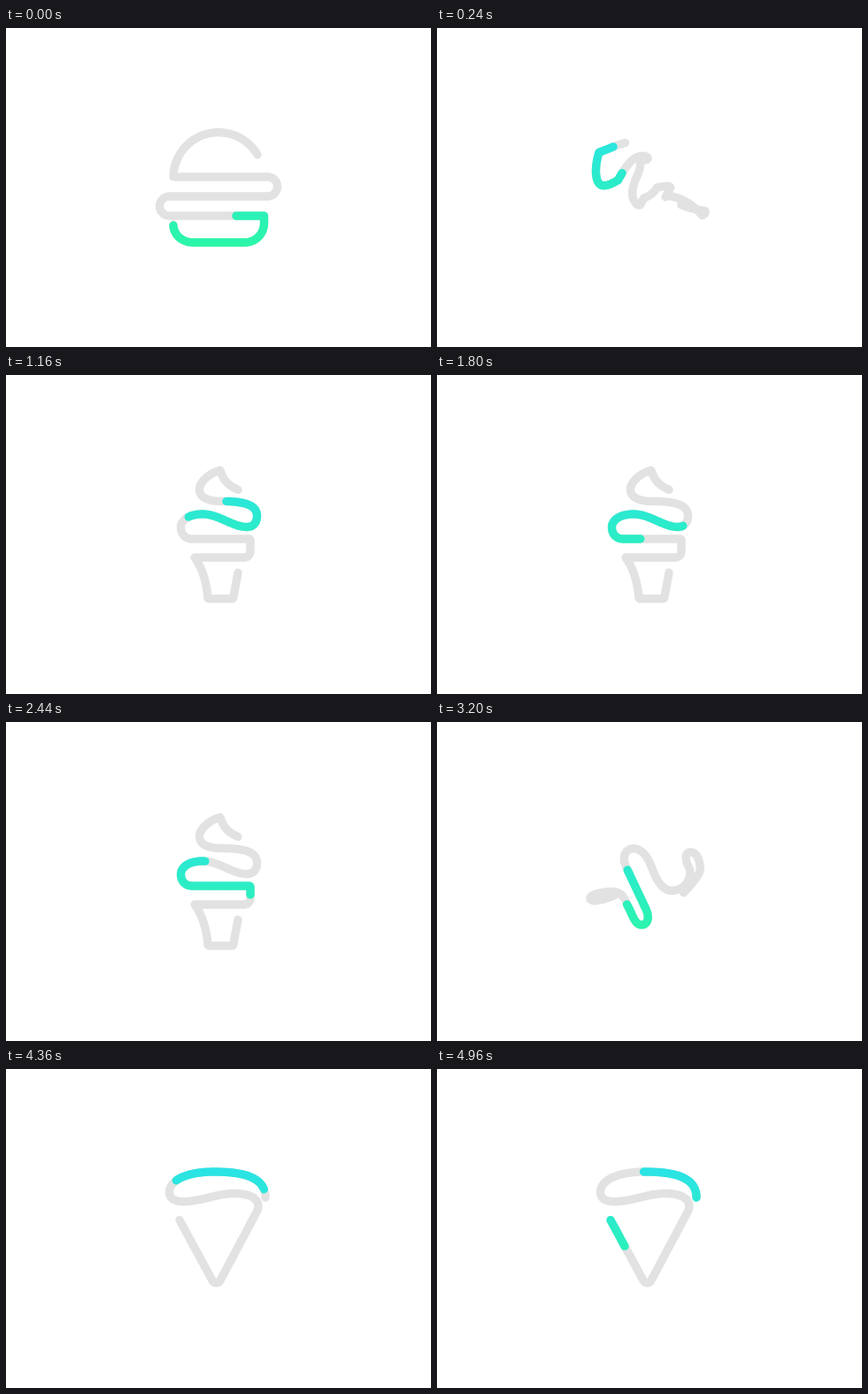
Animation of 480 by 360 pixels, one loop 5 s. Source, as an HTML page:

```html
<!DOCTYPE html>
<html lang="en">
<head>
<meta charset="utf-8">
<title>Food line loader</title>
<style>
  html, body { margin: 0; width: 100%; height: 100%; overflow: hidden; background: #fff; }
  svg { display: block; width: 100vw; height: 100vh; }
  path { fill: none; stroke-width: 9.4; stroke-linecap: round; stroke-linejoin: round; }
  #track { stroke: #e2e2e2; }
  #dash { stroke: url(#tint); stroke-dasharray: 250 750; }
</style>
</head>
<body>
<svg viewBox="0 0 480 360">
  <defs>
    <linearGradient id="tint" gradientUnits="userSpaceOnUse" x1="0" y1="112" x2="0" y2="245">
      <stop offset="0" stop-color="#2be3e6"/>
      <stop offset="1" stop-color="#2bf6a8"/>
    </linearGradient>
  </defs>
  <path id="track"/>
  <path id="dash" pathLength="1000"/>
</svg>
<script>
const LOOP = 5000, LAP = 6000, SECOND_TURN = 3000, MORPH = 400;
const CX = 240, CY = 180, SAMPLES = 300;

// Evenly spaced points along a path, relative to the stage centre.
function sample(d) {
  const path = document.createElementNS('http://www.w3.org/2000/svg', 'path');
  path.setAttribute('d', d);
  const len = path.getTotalLength();
  return Array.from({ length: SAMPLES + 1 }, (_, i) => {
    const p = path.getPointAtLength(len * i / SAMPLES);
    return [p.x - CX, p.y - CY];
  });
}

const burger = sample(
  'M189 222 A22 20 0 0 0 211 242 H270 A21.5 22 0 0 0 291.5 220 V212 H184.5 ' +
  'A11 11 0 0 1 184.5 190 H295.5 A11 11 0 0 0 295.5 168 H189 A51 51 0 0 1 284 143');
const cone = sample(
  'M262 129.5 C250 124 245 118 242 107.5 C229 111 218.5 121 218.5 129 ' +
  'C218.5 138 227 142 242 142.5 C262 142.5 283.5 144 283.5 159 ' +
  'C283.5 167 279 171.5 272 171.5 C256 171.5 240 157 222 157 ' +
  'C206 157 197.5 164 197.5 172 C197.5 180 203 185 210 185 H276 V198 ' +
  'Q276 206 268 206 H213 C222 218 227 236 228 252.5 H256.5 L262 223');
const pizza = sample(
  'M196 170.5 L233.5 239.5 Q237.5 243.5 241.5 239.5 L283.5 160.5 ' +
  'C288 151 282 140.5 258 140.5 C238 140.5 222 149 202 149.5 ' +
  'C192 150 184.5 147 184.5 139 C184.5 125 205 116 235 116 C268 116 293 122 293 145');
const squiggle = sample(
  'M279 192 C290 180 299 170 297 162 C296 152 292 146 286 146 ' +
  'C280 146 279 154 284 163 C289 172 282 192 262 190 ' +
  'C248 186 244 165 238 155 C233 146 226 143 222 143 ' +
  'C214 143 209 150 212 160 L214 165 L236 210 C242 222 238 229 232 229 ' +
  'C224 229 222 218 215 206 C212 196 206 192 198 192 ' +
  'C188 192 173 196 173 200 C174 206 190 202 206 194');

const halfTurn = pts => pts.map(([x, y]) => [-x, -y]);
const quarterBack = pts => pts.map(([x, y]) => [y, -x]);
const mix = (a, b, k) => a.map(([x, y], i) => [x + (b[i][0] - x) * k, y + (b[i][1] - y) * k]);

// Each turn morphs through its stops while rotating by 180 degrees.
const turns = [
  [burger, halfTurn(cone)],
  [cone, quarterBack(squiggle), halfTurn(pizza)]
];

function blend(stops, k) {
  const pos = k * (stops.length - 1);
  const i = Math.min(Math.floor(pos), stops.length - 2);
  return mix(stops[i], stops[i + 1], pos - i);
}

function ease(x) {
  x = Math.min(Math.max(x, 0), 1);
  return x * x * (3 - 2 * x);
}

// Small overshoot in degrees that dies away after the turn.
function overshoot(ms) {
  const u = Math.max(0, (ms - 360) / 90);
  return 4 * u * Math.exp(1 - u);
}

const track = document.getElementById('track');
const dash = document.getElementById('dash');

function draw(now) {
  const t = now % LOOP;
  const second = t >= SECOND_TURN;
  const ms = second ? t - SECOND_TURN : t;
  const k = ease(ms / MORPH);
  const angle = (180 * k + overshoot(ms)) * Math.PI / 180;
  const c = Math.cos(angle), s = Math.sin(angle);
  const d = 'M' + blend(turns[+second], k).map(([x, y]) =>
    (CX + x * c - y * s).toFixed(2) + ' ' + (CY + x * s + y * c).toFixed(2)).join('L');
  track.setAttribute('d', d);
  dash.setAttribute('d', d);
  dash.style.strokeDashoffset = -(1 + 1000 * t / LAP);
  requestAnimationFrame(draw);
}
draw(performance.now());
</script>
</body>
</html>
```
